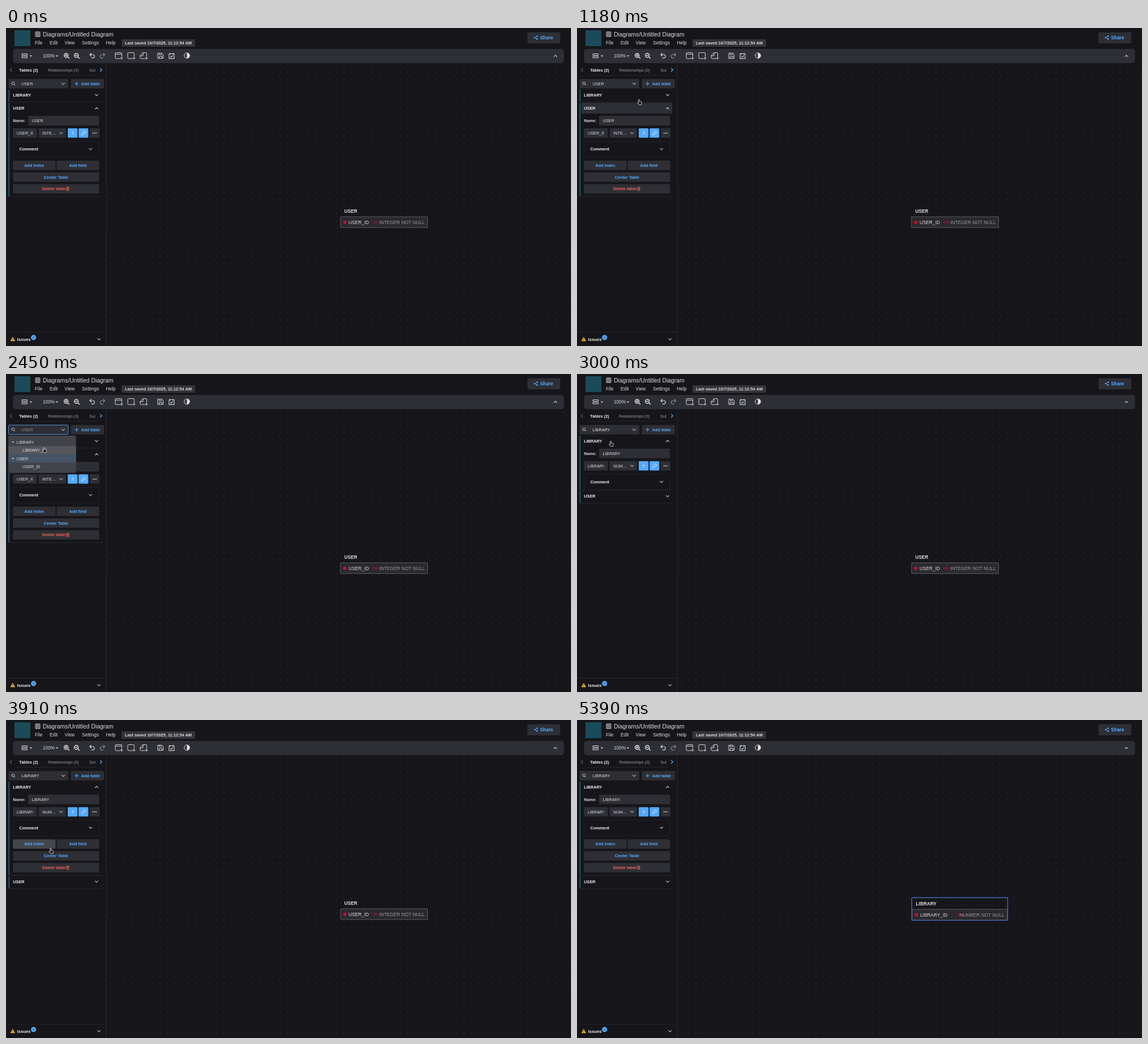
An HTML page with a canvas for the animation above (7490 ms loop, 998 by 561 pixels).

```html
<!DOCTYPE html>
<html lang="en">
<head>
<meta charset="utf-8">
<title>Diagram editor</title>
<style>
html, body { margin: 0; width: 100%; height: 100%; overflow: hidden; background: #16161a; }
canvas { display: block; }
</style>
</head>
<body>
<canvas id="stage" width="998" height="561"></canvas>
<script>
const g = document.getElementById('stage').getContext('2d');
const LOOP = 7490;
const BG = '#16161a', FILL = '#2e2f34', HOVER = '#43464c', LINE = '#26272b';
const WHITE = '#eeeef0', GREY = '#97989c', BLUE = '#54a9ff', RED = '#f0655c', CRIMSON = '#c4122f';
const SMALL = 7.28, MEDIUM = 8.32, LARGE = 10.4;

// Cursor moves: start, end, from x, y, to x, y, ease-out power
const MOVES = [
  [470, 590, 862, 476, 436, 346, 2],
  [790, 950, 436, 346, 170, 175, 2],
  [1120, 1320, 170, 175, 79, 101, 3],
  [1930, 2670, 79, 101, 66.5, 130, 3],
  [2880, 2990, 66.5, 130, 59.5, 118, 3],
  [3350, 4080, 59.5, 118, 80, 232, 2]
];
const OPEN = 1560, PICK = 2700, CLOSE = 2880, SWAP = 2922, CENTER = 4460, LEAVE = 5380;

const clamp = v => Math.max(0, Math.min(1, v));
const easeOut = (p, n = 3) => 1 - (1 - clamp(p)) ** n;

function pointer(t) {
  if (t < MOVES[0][0] || t >= LEAVE) return null;
  const [a, b, x0, y0, x1, y1, n] = MOVES.filter(m => m[0] <= t).pop();
  const p = easeOut((t - a) / (b - a), n);
  return { x: x0 + (x1 - x0) * p, y: y0 + (y1 - y0) * p };
}

let now = 0;
function hovered(x, y, w, h) {
  const p = pointer(now - 25);
  return now < LEAVE && p && p.x >= x && p.x <= x + w && p.y >= y && p.y <= y + h;
}
const panelHover = (...r) => (now < OPEN || now > 3020) && hovered(...r);

function box(x, y, w, h, fill, r = 1.5, stroke, lw = 1) {
  g.beginPath();
  g.roundRect(x, y, w, h, r);
  if (fill) { g.fillStyle = fill; g.fill(); }
  if (stroke) { g.strokeStyle = stroke; g.lineWidth = lw; g.stroke(); }
}

// y is the middle of the capitals
function text(s, x, y, color = WHITE, size = SMALL, bold = false, align = 'left') {
  g.font = `${bold ? 'bold ' : ''}${size}px "Liberation Sans", Arial, sans-serif`;
  g.textAlign = align;
  g.fillStyle = color;
  g.fillText(s, x, y + size * .355);
}

function clipped(x, y, w, h, draw) {
  g.save();
  g.beginPath();
  g.rect(x, y, w, h);
  g.clip();
  draw();
  g.restore();
}

function icon(x, y, d, color = '#d6d6d9', lw = 1, fill) {
  const path = new Path2D(d);
  g.save();
  g.translate(x, y);
  g.lineWidth = lw;
  g.lineCap = g.lineJoin = 'round';
  g.strokeStyle = color;
  if (fill) { g.fillStyle = fill; g.fill(path); }
  if (lw) g.stroke(path);
  g.restore();
}

function dot(x, y, r, color) {
  g.beginPath();
  g.arc(x, y, r, 0, 7);
  g.fillStyle = color;
  g.fill();
}

const down = (x, y, c = '#b4b5b9') => icon(x, y, 'M-2.6 -1.3L0 1.3L2.6 -1.3', c, 1.1);
const up = (x, y) => icon(x, y, 'M-2.6 1.3L0 -1.3L2.6 1.3', '#c4c5c8', 1.1);
const caret = (x, y) => icon(x, y, 'M-2.5 -1.2H2.5L0 1.5Z', '', 0, '#b8b9bd');
const hline = (x, y, w) => { g.fillStyle = LINE; g.fillRect(x, y, w, 1); };

function drawGrid() {
  g.fillStyle = '#4b4c50';
  for (let y = 65.6; y < 561; y += 12.48)
    for (let x = 185; x < 998; x += 12.48) g.fillRect(x - .5, y - .5, 1, 1);
}

function drawCard(x, y, w, name, type) {
  box(x, y + 20, w, 19, '#29292e', 0, '#5c5d61');
  text(name, x + 6.5, y + 10, '#dcdcdf', MEDIUM, true);
  dot(x + 7.5, y + 29.7, 2.9, CRIMSON);
  text(name + '_ID', x + 14, y + 29.7, '#dedee1', MEDIUM);
  icon(x + w - 86.5 + (type === 'NUMBER' ? 0 : -10), y + 29.7,
    'M0 0A2.2 2.2 0 1 1 4.4 0A2.2 2.2 0 1 1 0 0M4.4 -.8H9.5V.8H4.4', '#a3142b', .9);
  text(type + ' NOT NULL', x + w - 5, y + 29.7, '#96979a', MEDIUM, false, 'right');
}

function drawCanvas() {
  drawGrid();
  if (now < CENTER) drawCard(591, 313, 153.5, 'USER', 'INTEGER');
  else {
    drawCard(592, 314, 168, 'LIBRARY', 'NUMBER');
    box(591.3, 313.3, 169.4, 40.2, null, 1, '#4573cf', 1.2);
  }
}

function drawHeader() {
  g.fillStyle = BG;
  g.fillRect(0, 0, 998, 64);
  g.fillStyle = '#1b4b5a';
  g.fillRect(15, 4, 28, 28);
  box(51.2, 6, 9.6, 10, '#85868a', 2);
  icon(56, 11, 'M-4 -2H4M-4 1.3H4', '#4b4c50', .8);
  text('Diagrams/Untitled Diagram', 65, 11, '#dcdcdf', LARGE);
  [['File', 51], ['Edit', 77], ['View', 103.5], ['Settings', 134], ['Help', 176.5]]
    .forEach(([s, x]) => text(s, x, 26.5, '#dadadd', MEDIUM));
  box(204, 20, 130, 13, '#34353a', 1.5);
  text('Last saved 10/7/2025, 11:12:54 AM', 210, 26.5, '#dcdcdf', SMALL, true);
  box(921, 7.5, 58, 19.5, '#2c2f35', 2);
  icon(936, 17, 'M2 -2.3L-2 0L2 2.3', BLUE, .8);
  [[2, -2.4], [-2.2, 0], [2, 2.4]].forEach(([x, y]) => dot(936 + x, 17 + y, 1.3, BLUE));
  text('Share', 943.3, 17, BLUE, MEDIUM, true);
}

function drawToolbar() {
  box(12.5, 37, 973, 25, '#2e2f34', 5);
  icon(33, 49, 'M-4.5 -3.5H4.5V-.8H-4.5ZM-4.5 1H4.5V3.7H-4.5Z');
  caret(44, 49.5);
  text('100%', 65, 49.3, '#dcdcdf', MEDIUM);
  caret(90, 49.5);
  const lens = 'M-4.3 -.8A3.5 3.5 0 1 1 2.7 -.8A3.5 3.5 0 1 1 -4.3 -.8M1.8 1.8L4.5 4.4';
  icon(107, 49, lens + 'M-2.4 -.8H.8M-.8 -2.4V.8', '#d6d6d9', 1.5);
  icon(125, 49, lens + 'M-2.4 -.8H.8', '#d6d6d9', 1.5);
  const undo = 'M-1.5 -4.5L-4 -2L-1.5 .5M-4 -2H1.3A2.9 2.9 0 0 1 1.3 3.8H-1';
  icon(152, 49, undo, '#d6d6d9', 1.2);
  icon(170.5, 49, 'M1.5 -4.5L4 -2L1.5 .5M4 -2H-1.3A2.9 2.9 0 0 0 -1.3 3.8H1', '#88898d', 1.2);
  const frame = 'M2 5H-4A2 2 0 0 1 -6 3V-4A1.5 1.5 0 0 1 -4.5 -5.5H4A1.5 1.5 0 0 1 5.5 -4V1';
  const plus = 'M3 4.2H7.2M5.1 2.1V6.3';
  icon(199, 49, frame + plus + 'M-6 -2.8H5.5');
  icon(221, 49, frame + plus);
  icon(243, 49, 'M2 5H-4A2 2 0 0 1 -6 3V0L-1 -5.5H4A1.5 1.5 0 0 1 5.5 -4V1M-6 0H-1V-5.5' + plus);
  icon(273, 49, 'M-4.6 -4.6H2.4L4.6 -2.4V4.6H-4.6ZM-2.6 -4.4V-1.8H1.6V-4.4M-2.6 4.4V1.2H2.6V4.4');
  icon(292.5, 49.3, 'M-4.5 -3.8H4.5V4.6H-4.5ZM-2.5 -5V-3M2.5 -5V-3M-2 .6L-.4 2.2L2.2 -.6', '#d6d6d9', 1.1);
  icon(319.5, 48.7, 'M0 -4.8A4.8 4.8 0 0 1 0 4.8Z', '', 0, '#e4e4e6');
  icon(319.5, 48.7, 'M-4.8 0A4.8 4.8 0 1 1 4.8 0A4.8 4.8 0 1 1 -4.8 0', '#e4e4e6');
  up(970.5, 49.3);
}

function button(label, x, y, w, color = BLUE) {
  box(x, y, w, 16.5, panelHover(x, y, w, 16.5) ? HOVER : FILL);
  text(label, x + w / 2 - (color === RED ? 4 : 0), y + 8.3, color, SMALL, true, 'center');
}

// c is the middle line of the section header
function drawTable(name, type, c, height) {
  g.fillStyle = '#1c5e6e';
  g.fillRect(4.3, c - 9.5, 1.9, 21.5 + height);
  hline(6, c + 12 + height, 165);
  if (panelHover(8, c - 9.5, 160, 19)) box(8, c - 9.5, 160, 19, FILL);
  text(name, 12.3, c, WHITE, SMALL, true);
  if (!height) { down(160, c); if (now < SWAP || name === 'USER') return; }
  else up(160, c);
  clipped(0, c + 10, 176, height + 2, () => {
    text('Name:', 12.3, c + 22, '#d4d4d7', SMALL, true);
    box(39, c + 13.5, 125.3, 16.8, FILL);
    text(name, 45.5, c + 22, '#dcdcdf');
    box(12.3, c + 35.5, 42.2, 16.5, FILL);
    clipped(18, c + 35, 29.5, 18, () => text(name + '_ID', 19, c + 43.8, '#dcdcdf'));
    box(57.5, c + 35.5, 48.5, 16.5, FILL);
    text(type, 64.3, c + 43.8, '#dcdcdf');
    down(97.3, c + 43.8);
    box(109, c + 35.5, 17.4, 16.5, BLUE);
    text('?', 117.7, c + 43.8, WHITE, SMALL, true, 'center');
    box(128.2, c + 35.5, 17.2, 16.5, BLUE);
    icon(136.8, c + 43.8, 'M-3 3.2V1.5L-.3 -1.2A2 2 0 1 1 1.4 .5L-1 2.9Z', WHITE, .9);
    box(148, c + 35.5, 17, 16.5, FILL);
    [-2.7, 0, 2.7].forEach(x => dot(156.5 + x, c + 43.8, .95, '#d0d0d3'));
    box(12.8, c + 58.5, 151.2, 27.5, null, 2, '#222327');
    text('Comment', 23.5, c + 72, WHITE, SMALL, true);
    down(149.3, c + 72);
    button('Add index', 12.3, c + 92.4, 75.2);
    button('Add field', 89.5, c + 92.4, 75);
    button('Center Table', 12.3, c + 113.2, 152.2);
    button('Delete table', 12.3, c + 134, 152.2, RED);
    icon(108.8, c + 142.2, 'M-2.8 -2H2.8M-1 -3H1M-2.1 -2V3H2.1V-2M-.7 -.4V1.6M.7 -.4V1.6', RED, .8);
  });
}

function drawSearch() {
  const focus = now >= 1500 && now < 2900;
  box(4.5, 90, 105.5, 16.5, hovered(4, 90, 106, 17) && !focus ? '#3a3b40' : FILL, 1.5, focus && '#4d93dd');
  icon(13, 98, 'M-3 -.5A2.4 2.4 0 1 1 1.8 -.5A2.4 2.4 0 1 1 -3 -.5M1.2 1.2L3 3', '#c0c1c4');
  text(now < PICK ? 'USER' : 'LIBRARY', 27.5, 98.4, focus ? '#8d8e92' : '#dcdcdf');
  if (focus && Math.floor((now - OPEN) / 500) % 2 === 0) {
    g.fillStyle = '#e4e4e6';
    g.fillRect(27.4, 94.5, .8, 8);
  }
  down(101, 98.4);
  box(114.5, 90, 58.5, 16.5, FILL);
  icon(124.7, 98.3, 'M-3 0H3M0 -3V3', BLUE, 1.1);
  text('Add table', 132.8, 98.4, BLUE, SMALL, true);
}

function drawDropdown() {
  if (now < OPEN || now >= CLOSE + 80) return;
  const shown = easeOut((now - OPEN) / 200), scale = .8 + .2 * shown;
  g.save();
  g.globalAlpha = shown * (1 - clamp((now - CLOSE) / 80));
  g.translate(4.3, 108.6);
  g.scale(scale, scale);
  box(0, 0, 119.4, 66, '#42434a', 3);
  ['LIBRARY', 'LIBRARY_ID', 'USER', 'USER_ID'].forEach((s, i) => {
    const y = 4 + i * 14.56, child = i % 2;
    const fill = i === 2 ? '#465365' : hovered(4.3, 108.6 + y, 119.4, 14.5) && '#55565c';
    if (fill) box(0, y, 119.4, 14.56, fill, 0);
    if (!child) caret(7.7, y + 7.5);
    text(s, child ? 24.8 : 14.4, y + 7.4, '#e0e0e3');
  });
  g.restore();
}

function drawPanel() {
  g.fillStyle = BG;
  g.fillRect(0, 63, 177, 498);
  g.fillStyle = '#2a2b2f';
  g.fillRect(176.5, 64, 1, 497);
  g.fillStyle = '#222327';
  g.fillRect(180, 272, 1, 82);
  icon(8.7, 73.8, 'M1.4 -2.7L-1.4 0L1.4 2.7', '#66676b', 1.1);
  icon(168, 73.8, 'M-1.4 -2.7L1.4 0L-1.4 2.7', BLUE, 1.2);
  text('Tables (2)', 23.3, 74, WHITE, SMALL, true);
  text('Relationships (0)', 74.2, 74, GREY);
  clipped(140, 66, 18, 16, () => text('Subject Areas', 147, 74, GREY));
  hline(17, 83, 143);

  const old = now < SWAP, full = 143.5;
  const open = old ? 0 : full * easeOut((now - SWAP) / 260, 2);
  drawTable('LIBRARY', 'NUM…', 118.2, open);
  drawTable('USER', 'INTE…', 141.6 + open, old ? full : 0);
  drawSearch();
  drawDropdown();

  hline(0, 536, 177);
  icon(12, 549, 'M0 -3.2L3.5 3H-3.5Z', '#f0b72f', .8, '#f0b72f');
  icon(12, 549, 'M0 -1V.8M0 2V2.1', '#3a2c08', .8);
  text('Issues', 19.5, 549.3, WHITE, 7.7, true);
  dot(48.7, 546, 4.5, BLUE);
  text('0', 48.7, 546, '#22354a', 5.6, false, 'center');
  down(164.2, 549);
}

function drawPointer() {
  const p = pointer(now);
  if (!p) return;
  const typing = p.y < 107 || (now > 3350 && p.y > 131.5 && p.y < 148);
  if (now < 1150) {
    icon(p.x, p.y, 'M0 0V9L2.1 7.1L3.6 10.4L5 9.8L3.6 6.6H6.4Z', '#f4f4f4', .8, '#101012');
  } else if (typing) {
    const beam = 'M-2 -4.5H-.6L0 -4L.6 -4.5H2M0 -4V4M-2 4.5H-.6L0 4L.6 4.5H2';
    icon(p.x, p.y, beam, '#101012', 2.2);
    icon(p.x, p.y, beam, '#f0f0f0', 1);
  } else {
    icon(p.x, p.y, 'M-.9 .8Q0 -.4 .8 .8V3.5L4.2 4.2Q5 4.5 4.8 5.5L4 9.5H-.3L-2.8 6.2Q-2.6 5 -.9 6Z',
      '#f0f0f0', .8, '#141416');
  }
}

function frame() {
  now = performance.now() % LOOP;
  g.fillStyle = BG;
  g.fillRect(0, 0, 998, 561);
  drawCanvas();
  drawHeader();
  drawToolbar();
  drawPanel();
  drawPointer();
  requestAnimationFrame(frame);
}
frame();
</script>
</body>
</html>
```
